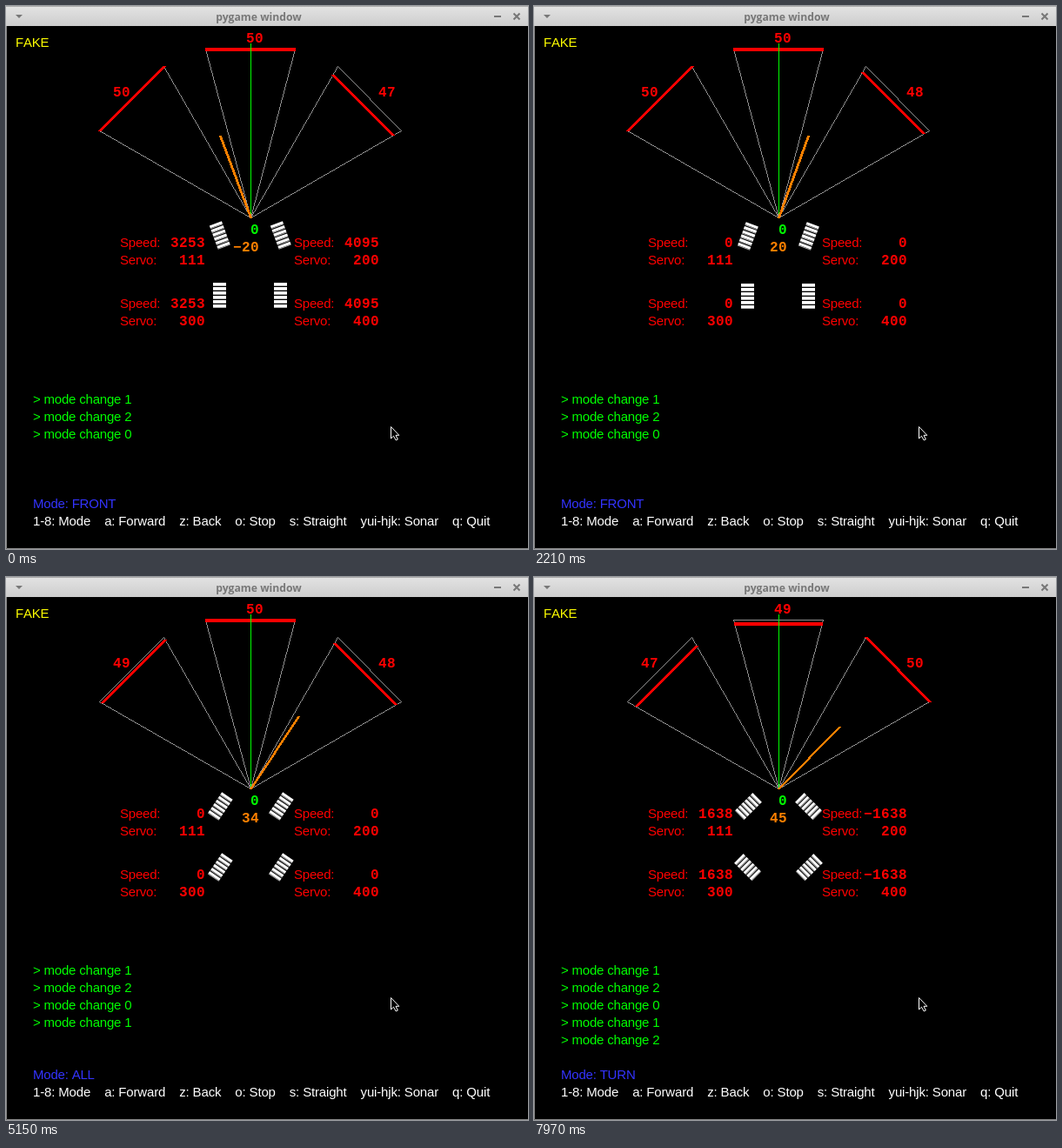
These frames come from a looping animation (600 by 624 pixels, 8000 ms). An HTML page with a canvas:

```html
<!DOCTYPE html>
<html lang="en">
<head>
<meta charset="utf-8">
<title>pygame window</title>
<style>
html, body { margin: 0; width: 100%; height: 100%; overflow: hidden; background: #000; }
canvas, svg { position: absolute; left: 0; top: 0; width: 600px; height: 624px; }
text { font: 15px "Liberation Sans", Arial, sans-serif; letter-spacing: -.2px; font-kerning: none; white-space: pre; }
.num { font: bold 16px "Liberation Mono", "Courier New", monospace; letter-spacing: .4px; text-anchor: end; }
.red { fill: #f00; }
.green { fill: #0f0; }
.orange { fill: #ff8000; }
.blue { fill: #33f; }
.yellow { fill: #ff0; }
.help { fill: #fff; letter-spacing: -.16px; }
.title { font: bold 12.2px "Open Sans", "Noto Sans", sans-serif; letter-spacing: 0; text-anchor: middle; fill: #777; }
</style>
</head>
<body>
<canvas id="view" width="600" height="624"></canvas>
<svg id="labels" viewBox="0 0 600 624">
  <defs>
    <linearGradient id="bar" x1="0" y1="0" x2="0" y2="1">
      <stop offset="0" stop-color="#e3e3e3"/><stop offset="1" stop-color="#cdcdcd"/>
    </linearGradient>
  </defs>
  <rect width="600" height="23" fill="url(#bar)"/>
  <path d="M0 .5H600" stroke="#aaa"/>
  <path d="M.5 23V623.5H600" fill="none" stroke="#888"/>
  <path d="M11 10H19L15 14Z" fill="#777"/>
  <path d="M561 12H569M583.5 8.5L590.5 15.5M590.5 8.5L583.5 15.5" stroke="#777" stroke-width="2"/>
  <text class="title" x="290.5" y="17">pygame window</text>
  <path d="M442.5 483.5V497L445.5 494.2L448.2 499L450.3 498L448 493.3H451.8Z" fill="#000" stroke="#fff"/>
</svg>
<script>
const LOOP = 8000, TICK = 40;
const CX = 281, CY = 243, RAD = Math.PI / 180, GRAY = '#909090';
const ctx = document.getElementById('view').getContext('2d');
const svg = document.getElementById('labels');

function label(x, y, cls, str = '') {
  const el = document.createElementNS('http://www.w3.org/2000/svg', 'text');
  el.setAttribute('x', x);
  el.setAttribute('y', y);
  el.setAttribute('class', cls);
  el.textContent = str;
  svg.append(el);
  return el;
}
function setText(el, str) {
  if (el.textContent !== str) el.textContent = str;
}
const signed = n => String(n).replace('-', '\u2212');

label(11, 47, 'yellow', 'FAKE');
label(31, 597, 'help', ['1-8: Mode', 'a: Forward', 'z: Back', 'o: Stop', 's: Straight',
  'yui-hjk: Sonar', 'q: Quit'].join('\u00a0'.repeat(4)));
label(291, 262, 'num green', '0');
const angleText = label(291, 282, 'num orange');
const modeText = label(31, 577, 'blue');
const logLines = [1, 2, 0, 1, 2].map((m, i) => label(31, 457 + i * 20, 'green', '> mode change ' + m));
const sonarText = [[143, 104], [296, 42], [448, 104]].map(([x, y]) => label(x, y, 'num red'));
const speedText = [111, 200, 300, 400].map((servo, i) => {
  const x = 131 + i % 2 * 200, y = 277 + (i >> 1) * 70;
  label(x, y, 'red', 'Speed:');
  label(x, y + 20, 'red', 'Servo:');
  label(x + 98, y + 20, 'num red', servo);
  return label(x + 98, y, 'num red');
});

const drives = [[0, 1840], [2980, 5150], [5980, 7530], [7670, LOOP]];
// Sonar distances (left, centre, right) reached at a given time
const scans = [
  [0, 50, 50, 47], [800, 49, 50, 50], [2210, 50, 50, 48], [3620, 50, 48, 49],
  [5150, 49, 50, 48], [6610, 50, 47, 50], [7970, 47, 49, 50]
];

// 0 to 1 while t goes from a to b
const ramp = (t, a, b) => Math.min(1, Math.max(0, (t - a) / (b - a)));

// The sensors are polled one after the other, the right one last
function sonarAt(now, i) {
  const lag = (2 - i) * 200;
  return scans.filter(s => !s[0] || now >= s[0] - lag).pop()[i + 1];
}

function speedsAt(t, mode, angle) {
  if (mode === 'ALL') {
    const v = 3700 * ramp(t, 2980, 3180) * (1 - ramp(t, 5030, 5150));
    return [v, v];
  }
  if (mode === 'FRONT') {
    const v = 4095 * (1 - ramp(t, 1680, 1840));
    const inner = v * (1 - .2056 * Math.abs(angle) / 20);
    return angle < 0 ? [inner, v] : [v, inner];
  }
  const spin = t < 7600
    ? -2945 * Math.sin(Math.PI * ramp(t, 5940, 7530)) * (t >= 5980)
    : 4095 * .05 * Math.max(0, (t - 7670) / TICK + 1);
  return [spin, -spin];
}

function stateAt(now) {
  let t = now, roll = 0;
  for (const [start, end] of drives) {
    if (now < start) break;
    const n = Math.floor((Math.min(now, end) - start) / TICK);
    roll += n;
    if (now < end) t = start + n * TICK;
  }
  const mode = now < 2710 ? 'FRONT' : now < 5470 ? 'ALL' : 'TURN';
  const steer = 40 * ramp(t, 0, 800) - 42 * ramp(t, 2980, 3620) + 56 * ramp(t, 3620, 5150) - 20;
  const angle = mode === 'TURN' ? 45 : Math.round(steer);
  const speeds = speedsAt(t, mode, angle).map(v => Math.round(v) || 0);
  return { mode, angle, roll, speeds, sonar: [0, 1, 2].map(i => sonarAt(now, i)) };
}

// Hard-edged line, widened along the minor axis
function line([x0, y0], [x1, y1], color, w = 1) {
  const dx = x1 - x0, dy = y1 - y0, n = Math.max(Math.abs(dx), Math.abs(dy));
  const off = (w - 1) >> 1, flat = Math.abs(dx) > Math.abs(dy);
  ctx.fillStyle = color;
  for (let i = 0; i <= n; i++) {
    const x = Math.round(x0 + dx * i / n), y = Math.round(y0 + dy * i / n);
    if (flat) ctx.fillRect(x, y - off, 1, w);
    else ctx.fillRect(x - off, y, w, 1);
  }
}
const polar = (deg, r) => [
  Math.floor(CX + r * Math.sin(deg * RAD) + 1e-6),
  Math.floor(CY - r * Math.cos(deg * RAD) + 1e-6)
];

function sector(mid, dist) {
  const r = Math.min(200, dist * 4 + .4);
  const a = polar(mid - 15, 200), b = polar(mid + 15, 200);
  line([CX, CY], a, GRAY);
  line([CX, CY], b, GRAY);
  line(a, b, GRAY);
  line(polar(mid - 15, r), polar(mid + 15, r), '#f00', 4);
}

function wheel(x, y, deg, roll) {
  ctx.save();
  if (deg) ctx.translate(x, y);
  else ctx.translate(x - .5, y - 1);
  ctx.rotate(deg * RAD);
  const band = (top, h, color) => {
    const a = Math.max(-15, top), b = Math.min(15, top + h);
    ctx.fillStyle = color;
    if (b > a) ctx.fillRect(-7.5, a, 15, b - a);
  };
  const phase = (roll % 5 + 5) % 5;
  for (let top = phase - 20; top < 15; top += 5) {
    band(top, 3, '#fff');
    band(top + 3, 1, '#aaa');
  }
  ctx.restore();
}

function draw(now) {
  const { mode, angle, roll, speeds, sonar } = stateAt(now);
  ctx.fillStyle = '#000';
  ctx.fillRect(0, 0, 600, 624);
  sonar.forEach((d, i) => sector(i * 45 - 45, d));
  line([CX, CY], polar(0, 200), '#0f0');
  line([CX, CY], polar(angle, 100), '#ff8000', 3);

  const turn = mode === 'TURN';
  for (let i = 0; i < 4; i++) {
    const right = i % 2, rear = i >> 1;
    const deg = turn ? (right ^ rear ? -angle : angle) : rear && mode === 'FRONT' ? 0 : angle;
    wheel(246 + right * 70, 264 + rear * 70, deg, speeds[right] < 0 ? -roll : roll);
    setText(speedText[i], signed(speeds[right]));
  }

  setText(angleText, signed(angle));
  setText(modeText, 'Mode: ' + mode);
  sonar.forEach((d, i) => setText(sonarText[i], String(d)));
  logLines[3].style.display = now < 2710 ? 'none' : '';
  logLines[4].style.display = now < 5470 ? 'none' : '';
}

const began = performance.now();
function frame() {
  draw((performance.now() - began) % LOOP);
  requestAnimationFrame(frame);
}
frame();
</script>
</body>
</html>
```
